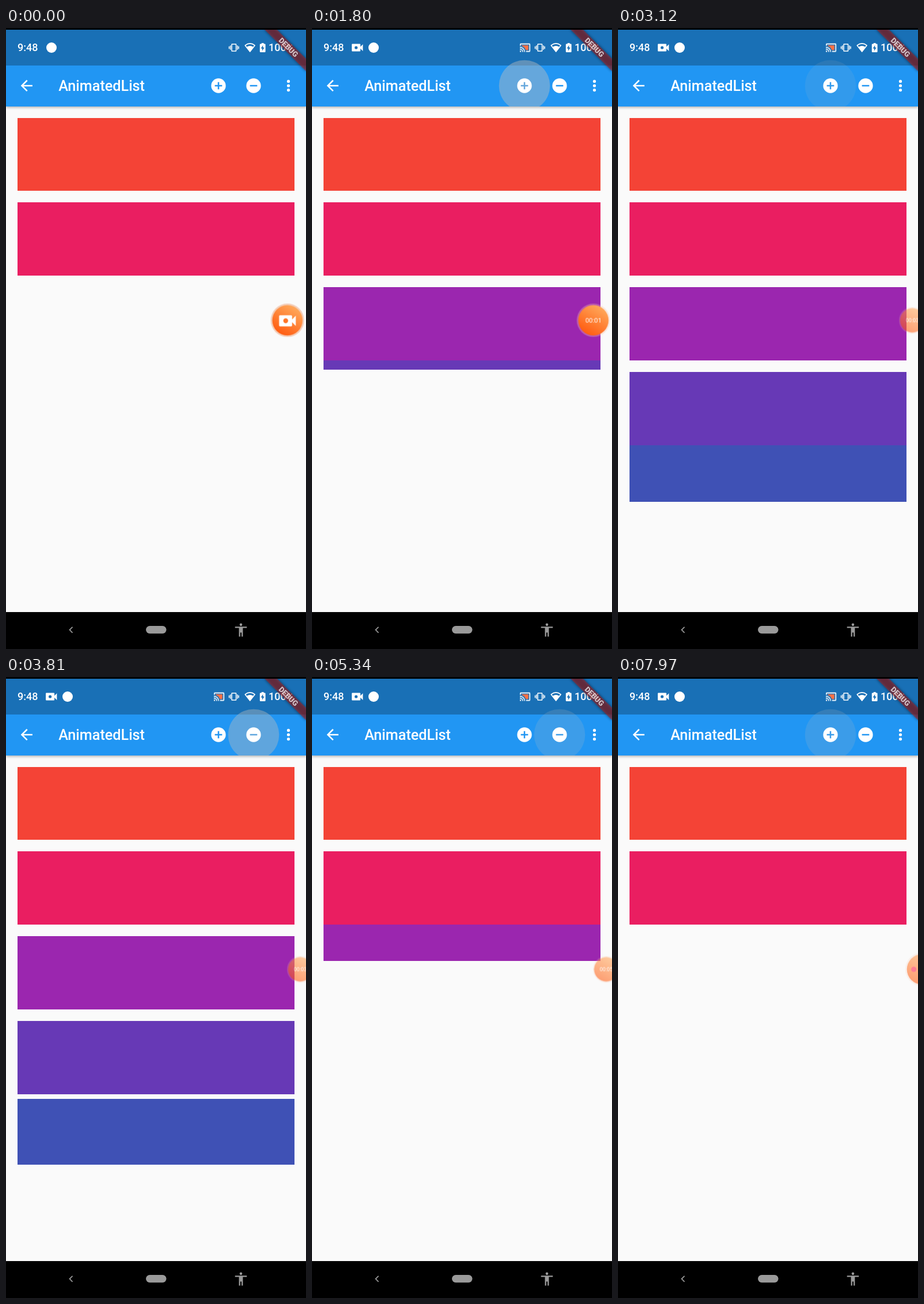
Animation of 521x1076 px, one loop 8 s. Source, as an HTML page:

```html
<!DOCTYPE html>
<html lang="en">
<head>
<meta charset="utf-8">
<title>Animated list</title>
<style>
  html, body { margin: 0; width: 100%; height: 100%; overflow: hidden; background: #fafafa; }
  body { position: relative; font-family: Roboto, sans-serif; }
  svg { position: absolute; left: 0; top: 0; overflow: hidden; }

  /* List: each row is clipped around its centre while it grows or shrinks */
  .list { position: absolute; left: 0; top: 135.4px; width: 521px; }
  .row { display: flex; align-items: center; height: 146.85px; overflow: hidden; }
  .row i { flex: none; width: 480.5px; height: 126.6px; margin: 20.25px 0 0 20.2px; background: var(--c); }
  .third  { animation: third 8s linear infinite; }
  .fourth { animation: fourth 8s linear infinite; }
  .fifth  { animation: fifth 8s linear infinite; }
  @keyframes third {
    0%, 10.5% { height: 0; } 14.25%, 64.625% { height: 146.85px; } 68.375%, 100% { height: 0; }
  }
  @keyframes fourth {
    0%, 22.09% { height: 0; } 25.84%, 55.65% { height: 146.85px; } 59.4%, 100% { height: 0; }
  }
  @keyframes fifth {
    0%, 36.5% { height: 0; } 40.25%, 47% { height: 146.85px; } 50.75%, 100% { height: 0; }
  }

  .bar {
    position: absolute; left: 0; top: 0; width: 521px; height: 135.5px;
    background: linear-gradient(#000 3px, #1970b6 3px 65px, #2196f3 65px);
    box-shadow: 0 2px 4px rgba(0, 0, 0, .28);
  }
  .nav { position: absolute; left: 0; top: 1012px; width: 521px; height: 64px; background: #000; }

  /* Touch ripples */
  .ripple { fill: #bebebe; opacity: 0; animation: press 8s linear var(--at) infinite; }
  .ripple.last { animation: press-last 8s linear infinite; }
  @keyframes press {
    0% { opacity: 0; } 1.75% { opacity: .17; } 2.875% { opacity: .46; } 5.375%, 100% { opacity: 0; }
  }
  @keyframes press-last { 0%, 97.875% { opacity: 0; } 99.625% { opacity: .17; } 100% { opacity: .19; } }

  /* Status icons that arrive when recording starts */
  .arrive { animation: arrive 8s linear infinite; }
  .shift { animation: shift 8s ease-out infinite; }
  @keyframes arrive { 0%, 1.2% { opacity: 0; } 4.5%, 100% { opacity: 1; } }
  @keyframes shift { 0%, 1.2% { transform: translateX(-28px); } 4.5%, 100% { transform: none; } }

  .menu {
    position: absolute; right: 10px; top: 65px; width: 142px; height: 202.6px;
    overflow: hidden; border-radius: 2.5px; background: #fff;
    box-shadow: 0 4px 9px rgba(0, 0, 0, .3), 0 1px 4px rgba(0, 0, 0, .2);
    animation: menu 8s linear infinite;
  }
  .menu-body { position: absolute; right: 0; top: 10.1px; width: 142px; }
  .option {
    position: relative; height: 60.8px; padding-left: 20.3px;
    font: 20.26px/58px "Noto Sans CJK SC", "Noto Sans CJK", sans-serif; color: #1d1d1d; white-space: nowrap;
  }
  .option span { opacity: 0; animation: option 8s linear var(--at) infinite; }
  .option:last-child { color: #3c3c3c; }
  .touch { position: absolute; inset: 0; background: #bcbcbc; animation: touch 8s linear infinite; }
  @keyframes menu {
    0%, 75.5% { width: 0; height: 0; opacity: 0; }
    76.75% { width: 142px; height: 101.3px; opacity: 1; }
    78%, 90.2% { width: 142px; height: 202.6px; opacity: 1; }
    91.04% { width: 142px; height: 101.3px; opacity: 1; }
    91.875%, 100% { width: 0; height: 0; opacity: 0; }
  }
  @keyframes option { 0% { opacity: 0; } 1.25%, 18% { opacity: 1; } 19%, 100% { opacity: 0; } }
  @keyframes touch { 0%, 85.4% { opacity: 0; } 88.1% { opacity: .4; } 90.6%, 100% { opacity: 0; } }

  /* Floating recorder button */
  .recorder { animation: recorder 8s linear infinite; }
  @keyframes recorder {
    0%, 26.1% { transform: translate(488.7px, 506.5px) scale(1); opacity: 1; }
    29.5%, 29.9% { transform: translate(511px, 506.5px) scale(.8); opacity: 1; }
    31.1%, 75.9% { transform: translate(511px, 506.5px) scale(.8); opacity: .58; }
    76.6%, 100% { transform: translate(528px, 506.5px) scale(1); opacity: .58; }
  }
  .camera { animation: camera 8s step-end infinite; }
  .dot { animation: dot 8s step-end infinite; }
  .tick { opacity: 0; animation: tick 8s step-end var(--at) infinite; }
  @keyframes camera { 0% { opacity: 1; } 1.125% { opacity: 0; } }
  @keyframes dot { 0% { opacity: 0; } 76.125% { opacity: 1; } }
  @keyframes tick { 0% { opacity: 1; } 12.5% { opacity: 0; } }
</style>
</head>
<body>
<div class="list">
  <div class="row" style="--c:#f44336"><i></i></div>
  <div class="row" style="--c:#ea1e61"><i></i></div>
  <div class="row third" style="--c:#9b26af"><i></i></div>
  <div class="row fourth" style="--c:#6739b6"><i></i></div>
  <div class="row fifth" style="--c:#3f51b5"><i></i></div>
</div>

<div class="bar"></div>
<svg width="521" height="135.5" fill="#fff">
  <g>
    <circle class="ripple" cx="369" cy="100" r="44.3" style="--at:620ms"/>
    <circle class="ripple" cx="369" cy="100" r="44.3" style="--at:1560ms"/>
    <circle class="ripple" cx="369" cy="100" r="44.3" style="--at:2740ms"/>
    <circle class="ripple last" cx="369" cy="100" r="44.3"/>
    <circle class="ripple" cx="430" cy="100" r="44.3" style="--at:3600ms"/>
    <circle class="ripple" cx="430" cy="100" r="44.3" style="--at:4230ms"/>
    <circle class="ripple" cx="430" cy="100" r="44.3" style="--at:4990ms"/>
    <circle class="ripple" cx="490.5" cy="100" r="44.3" style="--at:5890ms"/>
  </g>

  <!-- App bar -->
  <path transform="translate(20.6 84.8) scale(1.266)" d="M20 11H7.83l5.59-5.59L12 4l-8 8 8 8 1.41-1.41L7.83 13H20z"/>
  <text x="91.2" y="109.3" font-size="25.2" font-weight="500">AnimatedList</text>
  <path transform="translate(353.8 84.8) scale(1.266)" d="M12 2a10 10 0 1 0 0 20 10 10 0 0 0 0-20zm5 11h-4v4h-2v-4H7v-2h4V7h2v4h4z"/>
  <path transform="translate(414.8 84.8) scale(1.266)" d="M12 2a10 10 0 1 0 0 20 10 10 0 0 0 0-20zm5 11H7v-2h10z"/>
  <circle cx="490.5" cy="92.4" r="2.6"/><circle cx="490.5" cy="100" r="2.6"/><circle cx="490.5" cy="107.6" r="2.6"/>

  <!-- Status bar -->
  <g font-size="18" font-weight="500">
    <text x="20" y="40.4">9:48</text>
    <text x="456" y="40.4">100%</text>
  </g>
  <g class="arrive">
    <path transform="translate(65.9 21.2) scale(1.07)" d="M17 10.5V7a1 1 0 0 0-1-1H4a1 1 0 0 0-1 1v10a1 1 0 0 0 1 1h12a1 1 0 0 0 1-1v-3.5l4 4v-11z"/>
    <circle cx="76.6" cy="34" r="2.6" fill="#1970b6"/>
  </g>
  <circle class="shift" cx="107" cy="34" r="9"/>
  <g class="arrive"><g transform="translate(360.2 24.2) scale(.82)">
    <path fill="#ff7043" d="M19 7H5v1.63A13 13 0 0 1 13.37 17H19z"/>
    <path d="M1 18v3h3a3 3 0 0 0-3-3zm0-4v2a5 5 0 0 1 5 5h2a7 7 0 0 0-7-7zm0-4v2a9 9 0 0 1 9 9h2A11 11 0 0 0 1 10zM21 3H3a2 2 0 0 0-2 2v3h2V5h18v14h-7v2h7a2 2 0 0 0 2-2V5a2 2 0 0 0-2-2z"/>
  </g></g>
  <path transform="translate(386.8 25) scale(.75)" d="M0 15h2V9H0zm3 2h2V7H3zM22 9v6h2V9zm-3 8h2V7h-2zM16.500 3h-9A1.500 1.500 0 0 0 6 4.500v15A1.500 1.500 0 0 0 7.500 21h9a1.500 1.500 0 0 0 1.500-1.500v-15A1.500 1.500 0 0 0 16.500 3zM16 19H8V5h8z"/>
  <path d="M415.300 30.200Q423.700 23.600 432.100 30.200L423.700 41z" fill="none" stroke="#fff" stroke-width="1.600" stroke-linejoin="round"/>
  <path d="M417.500 33Q423.700 28.800 429.900 33L423.700 41z"/>
  <path fill-rule="evenodd" d="M443.800 27.500V26h3.800v1.500h1.800a1.200 1.200 0 0 1 1.200 1.200v12a1.200 1.200 0 0 1-1.200 1.200h-7.400a1.200 1.200 0 0 1-1.200-1.200v-12a1.200 1.200 0 0 1 1.200-1.200zM446.300 29.800l-3.700 5.800h2.300v4.200l3.800-6h-2.400z"/>
</svg>

<div class="nav"></div>
<svg width="521" height="1076" fill="#9a9a9a">
  <path d="M115.500 1037.800l-5 5 5 5" fill="none" stroke="#9a9a9a" stroke-width="1.700"/>
  <rect x="243" y="1036" width="35.500" height="13.200" rx="6.600"/>
  <path transform="translate(394.3 1029.300) scale(1.140)" d="M12 2a2 2 0 1 1 0 4 2 2 0 0 1 0-4zm9 7h-6v13h-2v-6h-2v6H9V9H3V7h18z"/>
</svg>

<div class="menu">
  <div class="menu-body">
    <div class="option" style="--at:6107ms"><span>展开收起</span></div>
    <div class="option" style="--at:6173ms"><div class="touch"></div><span>放大缩小</span></div>
    <div class="option" style="--at:6240ms"><span>渐变</span></div>
  </div>
</div>

<svg width="521" height="1076">
  <defs>
    <linearGradient id="orange" x1=".2" y1="1" x2=".8" y2="0">
      <stop offset=".1" stop-color="#ff5f14"/><stop offset="1" stop-color="#ffae60"/>
    </linearGradient>
    <filter id="soft" x="-20%" y="-60%" width="140%" height="220%"><feGaussianBlur stdDeviation="2.5"/></filter>
    <clipPath id="screen"><rect y="3" width="521" height="1073"/></clipPath>
  </defs>

  <!-- Corner ribbon -->
  <g clip-path="url(#screen)"><g transform="translate(521 3) rotate(45)">
    <rect x="-50.7" y="35.500" width="101.400" height="15.200" opacity=".5" filter="url(#soft)"/>
    <rect x="-50.7" y="35.500" width="101.400" height="15.200" fill="#b71c1c" fill-opacity=".5"/>
    <text y="47.700" text-anchor="middle" font-size="12.900" font-weight="900" fill="#fff" fill-opacity=".72">DEBUG</text>
  </g></g>

  <g class="recorder">
    <circle r="29" fill="#f5c4a8" opacity=".35"/>
    <circle class="camera" r="29" fill="#f3cdb8"/>
    <circle r="26.300" fill="url(#orange)"/>
    <g class="camera">
      <path transform="translate(-19.300 -18.500) scale(1.610)" fill="#fff" d="M17 10.500V7a1 1 0 0 0-1-1H4a1 1 0 0 0-1 1v10a1 1 0 0 0 1 1h12a1 1 0 0 0 1-1v-3.500l4 4v-11z"/>
      <circle cx="-3" cy=".8" r="4.200" fill="#ff7426"/>
    </g>
    <g fill="#fff" font-size="11.300" text-anchor="middle">
      <text class="tick" y="4.300" style="--at:90ms">00:00</text>
      <text class="tick" y="4.300" style="--at:1090ms">00:01</text>
      <text class="tick" y="4.300" style="--at:2090ms">00:02</text>
      <text class="tick" y="4.300" style="--at:3090ms">00:03</text>
      <text class="tick" y="4.300" style="--at:4090ms">00:04</text>
      <text class="tick" y="4.300" style="--at:5090ms">00:05</text>
    </g>
    <circle class="dot" cx="-14.300" r="4.600" fill="#ff2048"/>
  </g>
</svg>
</body>
</html>
```
